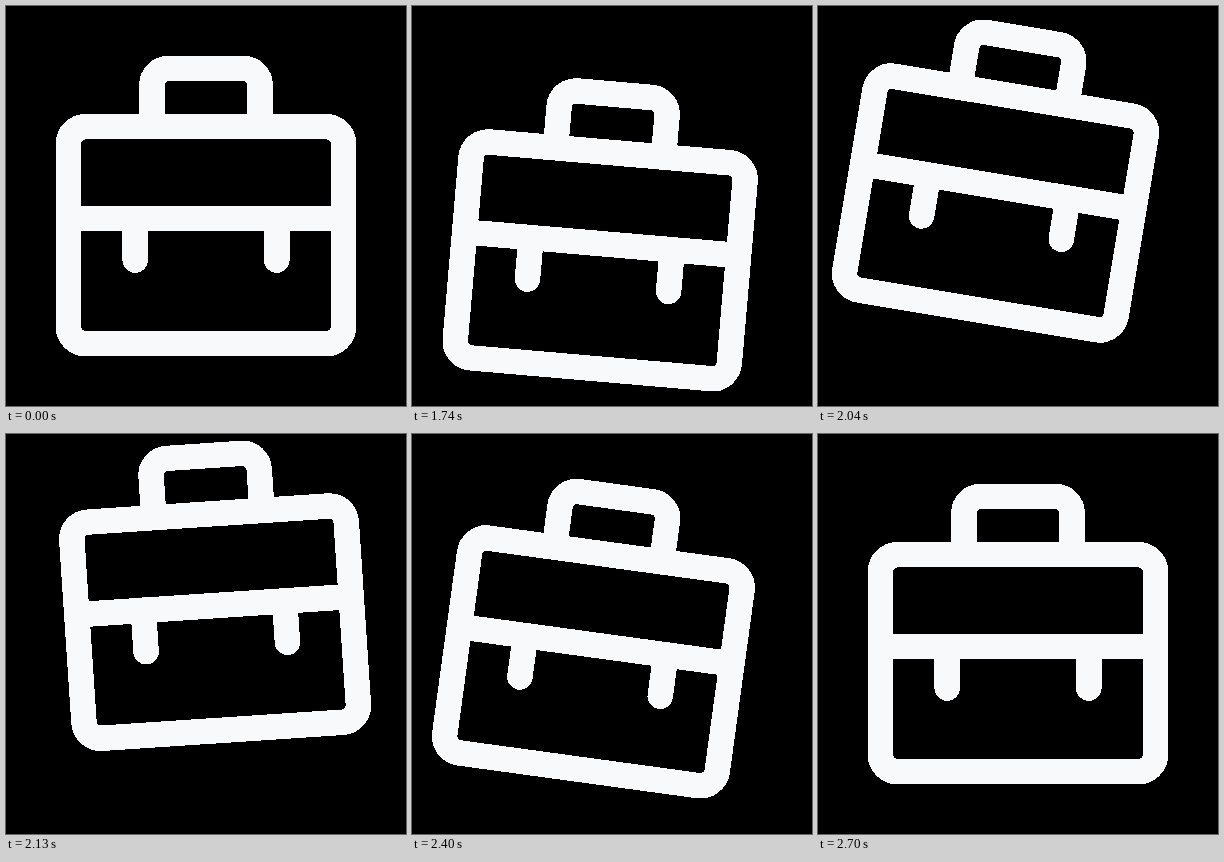
Recreate the animation shown at these times as an HTML page with a canvas. Size 400x400 px, loop 2730 ms.

```html
<!DOCTYPE html>
<html lang="en">
<head>
<meta charset="utf-8">
<title>Briefcase</title>
<style>
  html, body { margin: 0; width: 100%; height: 100%; overflow: hidden; background: #000; }
  canvas { display: block; width: 400px; height: 400px; }
</style>
</head>
<body>
<canvas id="stage" width="400" height="400"></canvas>
<script>
const SIZE = 400;
const LOOP = 2730;
const STEP = 30;
const PIVOT = { x: 200, y: 92 };
const ctx = document.getElementById('stage').getContext('2d', { willReadFrequently: true });

// Keys are [time in ms, value], eased in and out between neighbours.
const LIFT = [[1500, 0], [1810, 29.5], [2115, -41], [2407, 0]];
const TILT = [[1560, 0], [1985, 12.8], [2230, -13.3], [2440, 10], [2700, 0]];

function valueAt(keys, time) {
  if (time <= keys[0][0]) return keys[0][1];
  for (let i = 1; i < keys.length; i++) {
    const [t0, v0] = keys[i - 1];
    const [t1, v1] = keys[i];
    if (time < t1) {
      const p = (time - t0) / (t1 - t0);
      return v0 + (v1 - v0) * p * p * (3 - 2 * p);
    }
  }
  return keys[keys.length - 1][1];
}

function line(x0, y0, x1, y1) {
  ctx.moveTo(x0, y0);
  ctx.lineTo(x1, y1);
}

function drawBriefcase() {
  const radius = 16.67;
  ctx.beginPath();
  ctx.roundRect(62.5, 120.83, 275, 216.67, radius);
  line(62.5, 212.5, 337.5, 212.5);
  line(129.17, 212.5, 129.17, 254.17);
  line(270.83, 212.5, 270.83, 254.17);
  ctx.moveTo(145.83, 120.83);
  ctx.arcTo(145.83, 62.5, 200, 62.5, radius);
  ctx.arcTo(254.17, 62.5, 254.17, 120.83, radius);
  ctx.lineTo(254.17, 120.83);
  ctx.stroke();
}

// Turns soft edges into hard, stepped ones.
function hardenEdges() {
  const image = ctx.getImageData(0, 0, SIZE, SIZE);
  const pixels = new Uint32Array(image.data.buffer);
  const ink = 0xfffbf9f8; // #f8f9fb, opaque, in ABGR order
  for (let i = 0; i < pixels.length; i++) {
    pixels[i] = pixels[i] >>> 24 > 64 ? ink : 0;
  }
  ctx.putImageData(image, 0, 0);
}

function render(time) {
  ctx.clearRect(0, 0, SIZE, SIZE);
  ctx.save();
  ctx.translate(PIVOT.x, PIVOT.y + valueAt(LIFT, time));
  ctx.rotate(valueAt(TILT, time) * Math.PI / 180);
  ctx.translate(-PIVOT.x, -PIVOT.y);
  ctx.strokeStyle = '#f8f9fb';
  ctx.lineWidth = 25;
  ctx.lineCap = ctx.lineJoin = 'round';
  drawBriefcase();
  ctx.restore();
  hardenEdges();
}

const start = performance.now();
function tick() {
  const elapsed = (performance.now() - start) % LOOP;
  render(Math.floor(elapsed / STEP) * STEP);
  requestAnimationFrame(tick);
}
tick();
</script>
</body>
</html>
```
